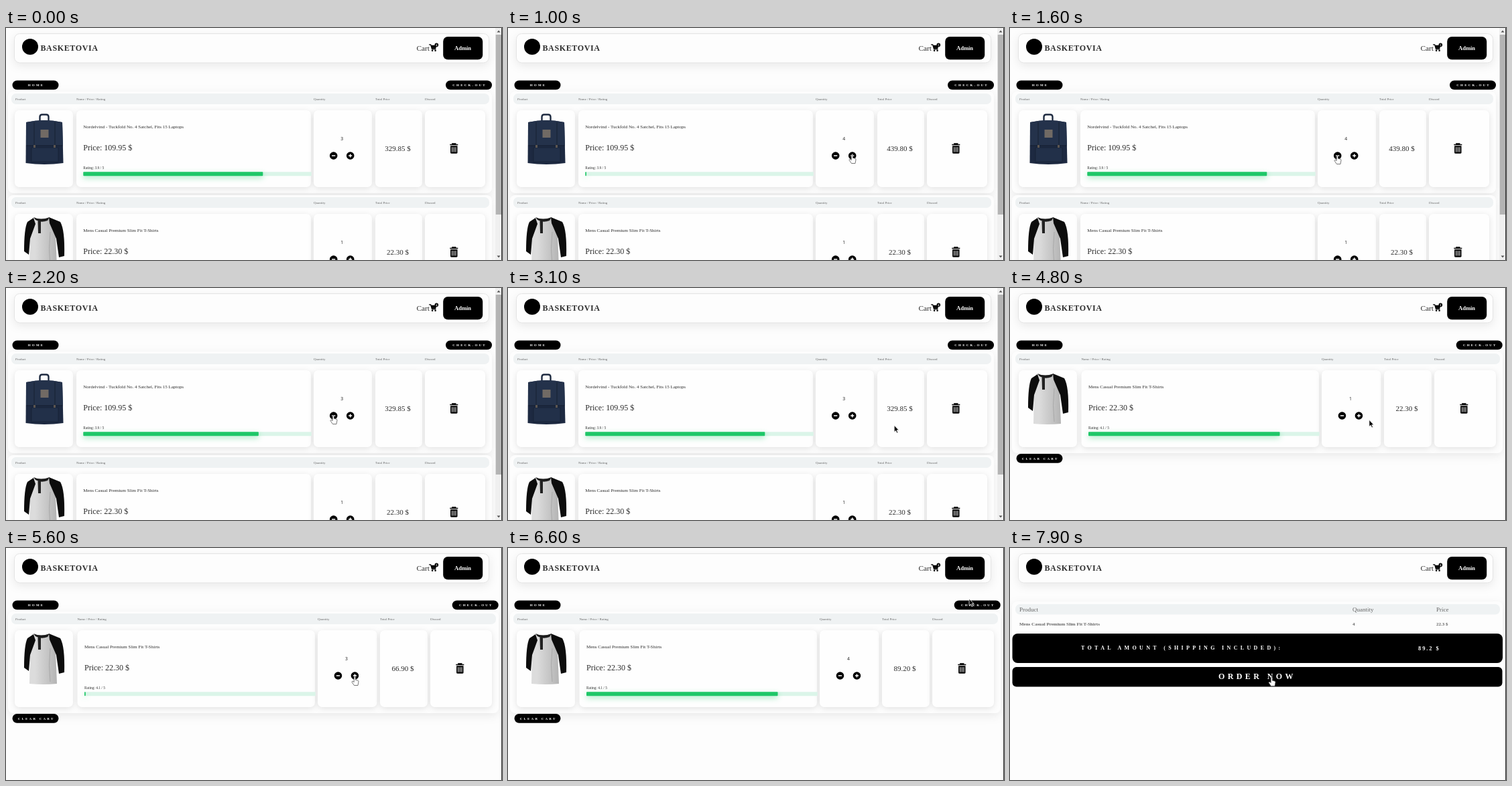
Recreate the animation shown at these times as an HTML page. Size 740 by 347 pixels, loop 8 s.

```html
<!DOCTYPE html>
<html lang="en">
<head>
<meta charset="utf-8">
<title>Shopping cart</title>
<style>
  html, body { margin: 0; width: 100%; height: 100%; overflow: hidden; background: #fdfdfd; }
  svg { display: block; width: 740px; height: 347px; }
  text { font-family: "Liberation Serif", serif; fill: #2c2c2c; white-space: pre; }
  .b { font-weight: bold; }
  .w { font-weight: bold; fill: #fff; }
  .m { text-anchor: middle; }
  .qty { font-family: "Noto Sans", sans-serif; }
  .head { fill: #666; }
  .panel { fill: #fdfdfd; filter: drop-shadow(0 4px 7px #00000014); }
  .cell { fill: #fefefe; filter: drop-shadow(0 2px 4px #0000001c); }
  .bar { fill: #1fc768; filter: drop-shadow(0 3px 4px #1fc76866); }
</style>
</head>
<body>
<svg id="stage" viewBox="0 0 740 347"></svg>
<script>
const LOOP = 8000, TICK = 100, BAR_MS = 480;

const rect = (x, y, w, h, r, attrs) =>
  `<rect x="${x}" y="${y}" width="${w}" height="${h}" rx="${r}" ${attrs}/>`;
const text = (x, y, size, str, cls = "", spacing = 0, id = "") =>
  `<text x="${x}" y="${y}" font-size="${size}" class="${cls}" letter-spacing="${spacing}" id="${id}">${str}</text>`;
const path = (d, attrs = "") => `<path d="${d}" ${attrs}/>`;
const group = (id, content, attrs = "") => `<g id="${id}" ${attrs}>${content}</g>`;

const pill = (x, y, label) =>
  rect(x, y, 69, 13.8, 6.9, "") + text(x + 35.6, y + 8.6, 5, label, "w m", 2.2);

const backpack =
  path("M50.5 140V133Q50.5 129.5 54 129.5H60Q63.5 129.5 63.5 133V140", 'fill="none" stroke="#1e2a40" stroke-width="2.4"') +
  path("M30 141Q57 135 84 141L85.5 202Q57 206 29.5 202Z", 'fill="#1d2941"') +
  path("M30 141Q57 135 84 141L85 175H30Z", 'fill="#24324b"') +
  path("M30 176H85M42 141V178M73 141V178", 'fill="none" stroke="#162033" stroke-width="1"') +
  path("M38 179H78V200H38Z", 'fill="#223049" stroke="#162033" stroke-width=".7"') +
  path("M41 175H44V179H41ZM71 175H74V179H71Z", 'fill="#5d5650"') +
  rect(51.5, 152, 12, 12, 0, 'fill="#716a64"');

const fabric = '<linearGradient id="fabric"><stop offset=".2" stop-color="#dcdcdc"/>' +
  '<stop offset="1" stop-color="#b4b4b4"/></linearGradient>';

const shirt =
  path("M41 130L36 152L35 203Q56 205 76 203L74 155L66 131Z", 'fill="url(#fabric)"') +
  path("M41 129L32 135Q27 145 27 179L34 184L36 160L44 138Z" +
       "M64 128L81 135Q88 147 87 186L79 188L75 160L65 137Z", 'fill="#0c0c0c"') +
  path("M41 128Q52 133 65 128L62 133Q52 137 44 132Z", 'fill="#1c1c1c"') +
  path("M47.5 134H52V152H48Z", 'fill="#222"') +
  path("M66 150Q63 176 66 200", 'fill="none" stroke="#a8a8a8"');

const sign = (x, plus) =>
  `<circle cx="${x}" cy="191" r="5.8"/>` +
  path(`M${x - 2.6} 191h5.2` + (plus ? `M${x} 188.4v5.2` : ""), 'stroke="#fff" stroke-width="1.5"');

const trash = x => group("", path("M-6 -5.6H6M-2.4 -6V-7.3H2.4V-6", 'fill="none" stroke="#000" stroke-width="1.5"') +
  path("M-5.2 -4H5.2V6Q5.2 7.6 3.6 7.6H-3.6Q-5.2 7.6 -5.2 6Z") +
  path("M-2.6 -2V5.4M0 -2V5.4M2.6 -2V5.4", 'stroke="#fff" stroke-width="1"'), `transform="translate(${x} 180.2)"`);

// Column edges with and without the scrollbar
const narrow = { right: 721, info: [105, 455], qty: [459, 546], total: [551, 621], bin: [625, 715], pad: 10.3 };
const wide = { right: 731, info: [106.5, 461], qty: [465, 553.5], total: [558, 629], bin: [633, 725], pad: 10.5 };
const mid = ([a, b]) => (a + b) / 2;

function itemRow(id, cols, item, dy) {
  const x = cols.info[0] + cols.pad, q = mid(cols.qty) - 1.3, b = mid(cols.bin) - 1.7;
  const heads = [[14, "Product"], [cols.info[0], "Name / Price / Rating"], [cols.qty[0], "Quantity"],
                 [cols.total[0], "Total Price"], [cols.bin[0], "Discard"]];
  return group(id,
    rect(3, 95, cols.right + 1, 152, 8, 'class="panel"') +
    rect(8, 98, cols.right - 8, 16, 7, 'fill="#eff2f3"') +
    heads.map(([hx, label]) => text(hx, 108, 5, label, "head")).join("") +
    [[13, 100], cols.info, cols.qty, cols.total, cols.bin]
      .map(([l, r]) => rect(l, 123, r - l, 115, 7, 'class="cell"')).join("") +
    group(id + "Photo", item.photo) +
    text(x, 150.3, 7, item.name) +
    text(x, 183.2, 12, `Price: ${item.price.toFixed(2)} $`) +
    text(x, 211, 5.4, `Rating: ${item.rating} / 5`) +
    rect(x, 215.3, cols.info[1] - x + .7, 6, 0, 'fill="#dbf5e9"') +
    rect(x, 215.3, 0, 6, 1, `class="bar" id="${id}Bar"`) +
    text(q, 168, 6.8, 1, "qty m", 0, id + "Qty") +
    sign(q - 12.5, false) + sign(q + 12.5, true) +
    text(mid(cols.total) - 1.6, 184, 11, item.price.toFixed(2) + " $", "m", 0, id + "Total") +
    trash(b), `transform="translate(0 ${dy})"`);
}

const bag = { name: "Nordelvind - Tuckfold No. 4 Satchel, Fits 15 Laptops", price: 109.95, rating: 3.9, photo: backpack };
const tee = { name: "Mens Casual Premium Slim Fit T-Shirts", price: 22.3, rating: 4.1, photo: shirt };

const cartIcon = group("",
  path("M631.5 25.2H634L636 31.8H641.8", 'fill="none" stroke="#000" stroke-width="1.3"') +
  path("M634.3 26H643L641.6 31H635.8Z") +
  '<circle cx="636.5" cy="34" r="1.3"/><circle cx="641" cy="34" r="1.3"/>', 'transform="translate(-.4 -.3)"');

const header =
  rect(12.5, 8.5, 708, 43.5, 8, 'class="panel" stroke="#e4e4e4" stroke-width="1"') +
  '<circle cx="36" cy="28" r="12"/>' +
  text(51.5, 34, 12, "BASKETOVIA", "b", .62) +
  text(612.5, 33.5, 11.3, "Cart") + cartIcon +
  '<circle cx="642.3" cy="25.4" r="2.8"/>' +
  text(642.3, 27, 4.5, "", "w m", 0, "badge") +
  rect(652.2, 12.9, 59, 34.3, 7, "") + text(681.6, 32.8, 8.5, "Admin", "w m");

const scrollbar =
  rect(730, 0, 10, 347, 0, 'fill="#f0f0f0"') + rect(730.7, 10, 8.3, 269, 0, 'fill="#b4b4b4"') +
  path("M732.5 6.5L735 3.5L737.5 6.5ZM732.5 340.5L735 343.5L737.5 340.5Z", 'fill="#555"');

const checkout =
  rect(3, 80, 732, 60, 8, 'class="panel"') +
  rect(8, 84, 723, 15.5, 7, 'fill="#eff2f3"') +
  [[14, "Product"], [511, "Quantity"], [636, "Price"]].map(([x, s]) => text(x, 94.5, 9, s, "head")).join("") +
  [[14, tee.name], [511, "4"], [636, "22.3 $"]].map(([x, s]) => text(x, 115.5, 7, s, "b head")).join("") +
  rect(3.5, 128, 731.5, 44, 8, "") + rect(3.5, 178, 731, 29.5, 6, "") +
  text(106, 152.3, 8, "TOTAL AMOUNT (SHIPPING INCLUDED):", "w", 4.35) +
  text(609, 152.5, 8.5, "89.2 $", "w", 1.9) +
  text(311, 196.3, 12, "ORDER NOW", "w", 4.4);

const hand = path("M-1.8 -6Q-.6 -7 .4 -6V-1.8L4.2 -.8Q5.2 -.3 5 1L4 6.5H-1.6L-5 1.4Q-4.6 -.4 -3 .6L-1.8 1.6Z",
  'fill="#fff" stroke="#555" stroke-width=".8"');
const arrow = path("M0 0V10L2.3 8L4 11.6L5.6 10.8L4 7.4H7Z", 'fill="#000" stroke="#fff" stroke-width=".8"');

stage.innerHTML =
  fabric +
  rect(0, 0, 740, 347, 0, 'fill="#fdfdfd"') +
  header +
  group("cart", itemRow("bag", narrow, bag, 0) + itemRow("tee", narrow, tee, 155) +
    pill(9.5, 78.5, "HOME") + pill(656, 78.5, "CHECK-OUT") + scrollbar) +
  group("solo", itemRow("one", wide, tee, 0) +
    rect(18, 123.5, 78, 80.5, 0, 'fill="#e1e3e7" id="blank"') +
    pill(9.5, 78.5, "HOME") + pill(665.7, 78.5, "CHECK-OUT") + pill(9.5, 247.9, "CLEAR CART")) +
  group("checkout", checkout) +
  rect(739, 0, 1, 347, 0, 'fill="#333"') +
  group("hand", hand) + group("arrow", arrow);

// Time, page, quantity, start of the rating bar
const states = [
  [0, "cart", 3, -1000], [1000, "cart", 4, 1000], [1800, "cart", 3, 1800],
  [3800, "solo", 1, 4100], [5000, "solo", 2, 5000], [5600, "solo", 3, 5600],
  [6000, "solo", 4, 6000], [6900, "checkout", 4, 0]
];

// Time, x, y, pointer shape until the next entry
const moves = [
  [0, 684, 36, ""], [300, 684, 44, "arrow"], [700, 514, 196, "hand"], [1500, 514, 196, "hand"],
  [1600, 489, 197, "hand"], [2300, 489, 197, "hand"], [2600, 530, 206, "arrow"],
  [2800, 566, 208, "arrow"], [3000, 566, 208, "arrow"], [3500, 664, 183, "hand"],
  [4400, 664, 183, "arrow"], [4900, 521, 199, "hand"], [6200, 521, 199, "arrow"],
  [6600, 688, 76, "arrow"], [7200, 688, 80, "arrow"], [7400, 530, 108, "arrow"],
  [7500, 400, 150, ""], [7800, 391, 200, "hand"], [LOOP, 391, 200, "hand"]
];

const el = id => document.getElementById(id);
const show = (id, on) => el(id).setAttribute("display", on ? "inline" : "none");
const clamp = u => Math.max(0, Math.min(1, u));
const settle = u => 1 - (1 - u ** 1.3) ** 2.3;

function updateRow(id, item, qty, barStart, full, t) {
  const u = clamp((t - barStart + 5) / BAR_MS);
  // The bar stays empty while the photo is still loading
  const width = t < barStart || (id === "one" && t < 4100) ? 0 : Math.max(1, full * settle(u));
  el(id + "Bar").setAttribute("width", width);
  el(id + "Qty").textContent = qty;
  el(id + "Total").textContent = (item.price * qty).toFixed(2) + " $";
}

function draw(t) {
  const [, page, qty, barStart] = states.findLast(s => s[0] <= t);
  for (const name of ["cart", "solo", "checkout"]) show(name, name === page);
  if (page === "cart") updateRow("bag", bag, qty, barStart, 268, t);
  if (page === "solo") updateRow("one", tee, qty, barStart, 285.5, t);
  show("blank", t < 4100);
  show("onePhoto", t >= 4100);
  el("badge").textContent = page === "cart" ? qty + 1 : qty;

  const i = moves.findLastIndex(m => m[0] <= t);
  const [t0, x0, y0, shape] = moves[i], [t1, x1, y1] = moves[i + 1];
  const u = (t - t0) / (t1 - t0), k = u * u * (3 - 2 * u);
  for (const name of ["hand", "arrow"]) show(name, name === shape);
  if (shape) el(shape).setAttribute("transform", `translate(${x0 + (x1 - x0) * k} ${y0 + (y1 - y0) * k})`);
}

const start = performance.now();
function frame() {
  const t = (performance.now() - start) % LOOP;
  draw(Math.floor(t / TICK) * TICK);
  requestAnimationFrame(frame);
}
frame();
</script>
</body>
</html>
```
